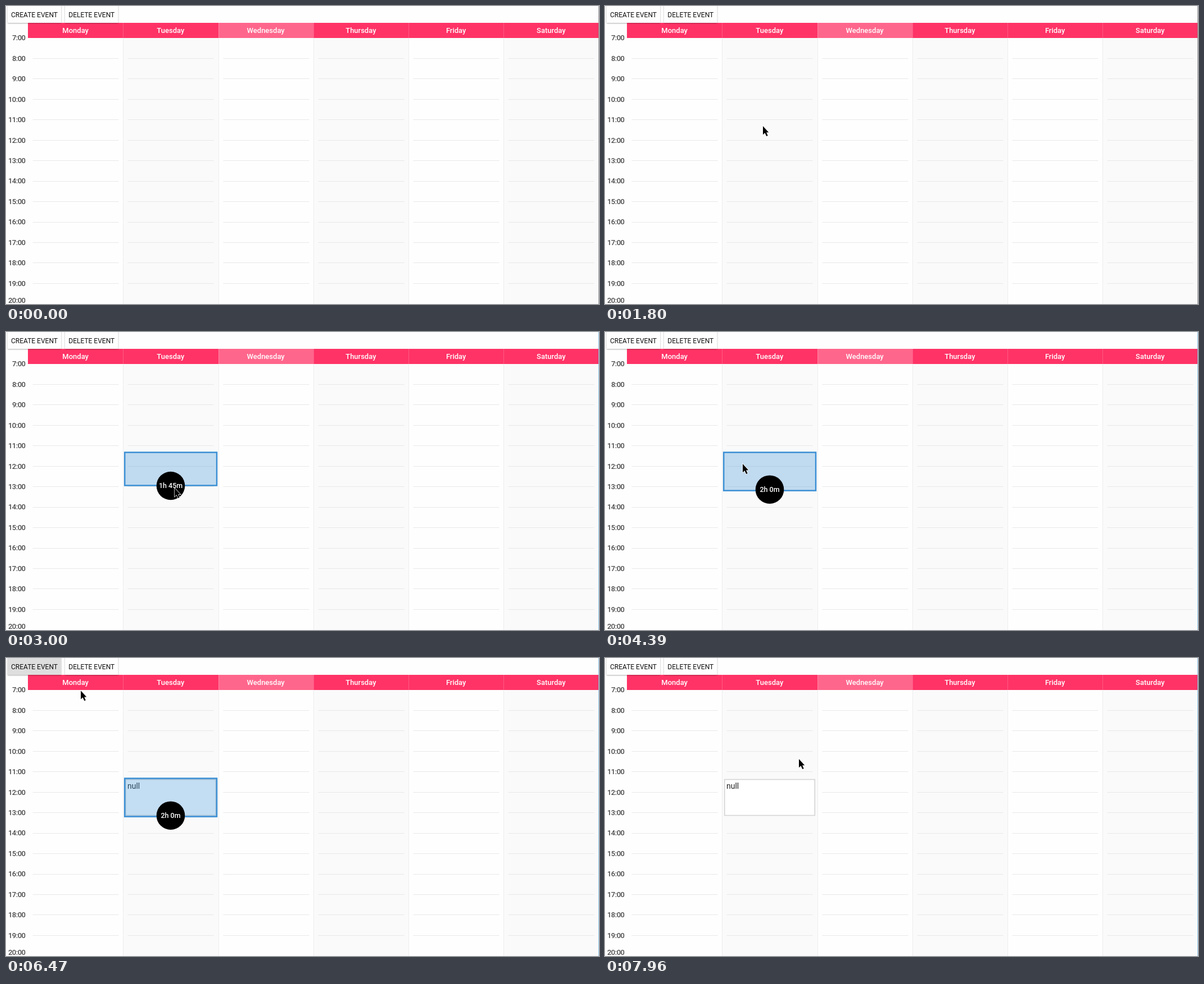
An HTML page for the animation above (8000 ms loop, 1055 px wide and 531 px high).

```html
<!DOCTYPE html>
<html lang="en">
<head>
<meta charset="utf-8">
<title>Week planner</title>
<style>
  html, body { margin: 0; width: 100%; height: 100%; overflow: hidden; background: #fefefe; }
  svg { display: block; font: 500 13px Roboto, sans-serif; }
  text { white-space: pre; }
  .hour { letter-spacing: -.5px; fill: #4a4a4a; }
  .button rect { fill: #fefefe; }
  .button text { font-size: 12px; font-weight: 400; fill: #111; }
</style>
</head>
<body>
<svg id="stage" width="1055" height="531" viewBox="0 0 1055 531"></svg>
<script>
const LOOP = 8000, LEFT = 39, TOP = 57, COLUMN = 169.25, HOUR = 36.45, SLOT = HOUR / 4;
const DAYS = ['Monday', 'Tuesday', 'Wednesday', 'Thursday', 'Friday', 'Saturday'];
const stage = document.getElementById('stage');

function add(tag, attributes, parent = stage) {
  const node = document.createElementNS('http://www.w3.org/2000/svg', tag);
  set(node, attributes);
  return parent.appendChild(node);
}
function set(node, attributes) {
  for (const name in attributes) node.setAttribute(name, attributes[name]);
}
function label(text, x, y, attributes = {}, parent = stage) {
  const node = add('text', { x, y, 'text-anchor': 'middle', ...attributes }, parent);
  node.textContent = text;
  return node;
}
const box = (x, y, width, height, attributes, parent) =>
  add('rect', { x, y, width, height, ...attributes }, parent);
const show = (node, visible) => node.setAttribute('visibility', visible ? 'visible' : 'hidden');

// Calendar grid
DAYS.forEach((day, i) => {
  const x = Math.round(LEFT + i * COLUMN);
  const width = Math.round(LEFT + (i + 1) * COLUMN) - x;
  if (i % 2) box(x, TOP, width, 474, { fill: '#fafafa' });
  if (i) box(x, TOP, 1, 474, { fill: '#ededed' });
  for (let h = 1; h < 13; h++)
    box(x + 8.5, Math.floor(TOP + h * HOUR), 153, 1, { fill: '#e8e8e8' });
  box(x, 30, width, 27, { fill: day === 'Wednesday' ? '#ff668c' : '#ff3366' });
  if (i) box(x, 30, 1, 27, { fill: '#fff', opacity: .2 });
  label(day, LEFT + (i + .5) * COLUMN, 48, { fill: '#fff' });
});
for (let h = 0; h < 14; h++)
  label(`${h + 7}:00`, 34.5, h === 13 ? 529 : TOP + h * HOUR + 4.3, { class: 'hour', 'text-anchor': 'end' });
const edge = box(1054, 0, 1, 531, {});

function makeButton(text, x, width) {
  const group = add('g', { class: 'button' });
  const face = box(x, -2, width, 32, {}, group);
  face.style.filter = 'drop-shadow(0 1px 1px rgba(0,0,0,.32))';
  label(text, x + width / 2, 19.8, {}, group);
  return face;
}
const createFace = makeButton('CREATE EVENT', 3, 95);
makeButton('DELETE EVENT', 105, 94.5);

const eventCard = add('g', {});
box(212.75, 216.5, 160.5, 64, { fill: '#fff', stroke: '#d4d4d4', 'stroke-width': 1.6 }, eventCard);
label('null', 216, 232.5, { 'text-anchor': 'start', fill: '#222', 'font-size': 14, 'font-weight': 400 }, eventCard);

const selection = add('g', {});
const range = box(211.2, 214.5, 163.8, 0,
  { fill: 'rgba(58,143,212,.3)', stroke: '#3a8fd4', 'stroke-width': 2.5 }, selection);
const bubble = add('circle', { cx: 293, r: 25.3 }, selection);
const duration = label('', 293, 0, { fill: '#fff', 'font-size': 12.5 }, selection);

const arrow = add('path', {
  d: 'M0 0V15.2L3.5 12L6.2 18L8.7 16.9L6.1 11.2H10.2Z',
  stroke: '#fff', 'stroke-width': 1.4, 'paint-order': 'stroke'
});
const hand = add('path', {
  d: 'M-1.3 8V1Q-1.3-.5 0-.5T1.3 1V5.5Q2.8 4.6 3.8 6Q5.4 5.3 6 6.8Q7.6 6.4 7.6 8.5V12L6 17H-1.6L-5 11.4Q-5.6 9.2-3.6 9.6L-1.3 11.5Z',
  fill: '#fff', stroke: '#222', 'stroke-width': 1
});

// Pointer moves: start, end, number of steps, x, y
const MOVES = [
  [170, 170, 1, 797, 512], [250, 320, 2, 569, 422],
  [720, 870, 3, 401, 305], [1180, 1330, 3, 255, 226],
  [1640, 1800, 3, 281, 214], [1880, 2190, 5, 287, 210],
  [2580, 3000, 6, 300, 278], [3070, 3240, 3, 301, 284.7],
  [4390, 4390, 1, 245, 235], [4470, 4930, 7, 122, 60],
  [5240, 5620, 6, 73, 16],
  [6470, 6720, 4, 244.5, 136.5],
  [7250, 7570, 5, 341, 200], [7810, 7960, 3, 345, 180]
];

function pointerAt(time) {
  let x = 797, y = 512;
  for (const [start, end, steps, toX, toY] of MOVES) {
    if (time < start) break;
    const interval = (end - start) / (steps - 1) || 1;
    const done = Math.min(1, (Math.floor((time - start) / interval + .01) + 1) / steps);
    const eased = 1 - (1 - done) ** 1.5;
    x += (toX - x) * eased;
    y += (toY - y) * eased;
  }
  return { x, y };
}
const ramp = (time, start, length) => Math.max(0, Math.min(1, (time - start) / length));

function draw(time) {
  const { x, y } = pointerAt(time);
  const overButton = x < 98 && y < 30;
  for (const cursor of [arrow, hand]) set(cursor, { transform: `translate(${x} ${y})` });
  show(arrow, time >= 170 && !overButton);
  show(hand, overButton);

  const hover = ramp(time, 5390, 200) - ramp(time, 6500, 200);
  const shade = Math.round(254 - 32 * hover);
  createFace.style.fill = `rgb(${shade},${shade},${shade})`;
  const press = Math.sin(Math.PI * ramp(time, 5860, 330));
  createFace.style.filter = `drop-shadow(0 1px ${1 + press}px rgba(0,0,0,.32))`;

  set(edge, { fill: time < 2340 ? '#969696' : '#8cc0e6' });
  show(selection, time >= 2340 && time < 6870);
  show(eventCard, time >= 6020);

  const center = pointerAt(Math.min(time, 3240)).y - 4;
  const slots = Math.max(1, Math.round((center - 211.9) / SLOT));
  set(range, { height: slots * SLOT - 4.8 });
  set(bubble, { cy: center });
  set(duration, { y: center + 4.2 });
  duration.textContent = `${Math.floor(slots / 4)}h ${slots % 4 * 15}m`;
}

const began = performance.now();
function tick() {
  draw((performance.now() - began) % LOOP);
  requestAnimationFrame(tick);
}
tick();
</script>
</body>
</html>
```
